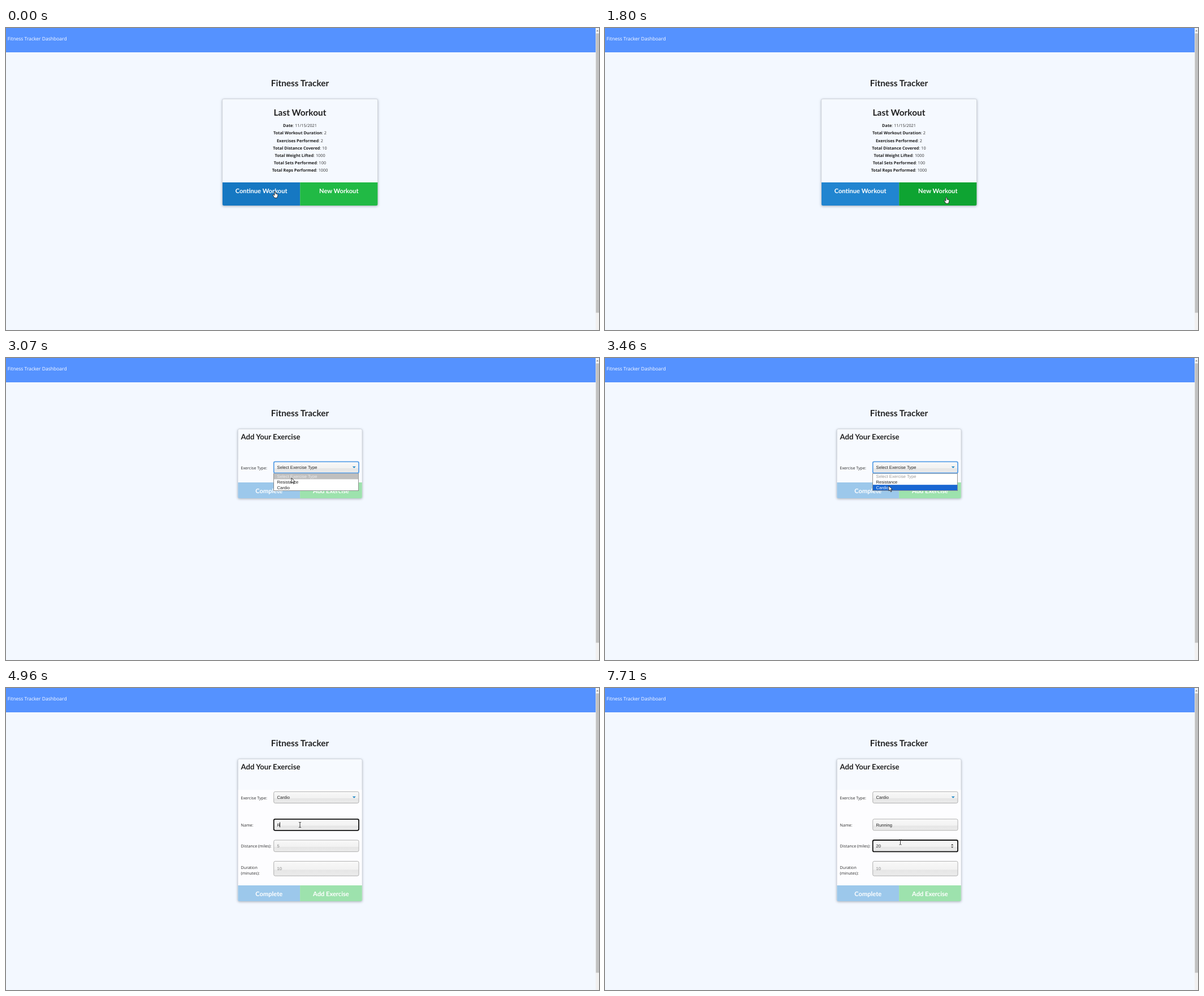
These frames come from a looping animation (1049x534 px, 8 s). An HTML page with a canvas:

```html
<!DOCTYPE html>
<html lang="en">
<head>
<meta charset="utf-8">
<title>Fitness Tracker</title>
<style>
html, body { margin: 0; width: 100%; height: 100%; overflow: hidden; background: #f3f8ff; }
canvas { display: block; }
</style>
</head>
<body>
<canvas id="stage" width="1049" height="534"></canvas>
<script>
const ctx = document.getElementById('stage').getContext('2d');
ctx.textRendering = 'geometricPrecision';

const LOOP = 8000;
const LATO = 'Lato, sans-serif';
const BODY = '"Open Sans", sans-serif';
const ARIAL = '"Liberation Sans", Arial, sans-serif';

// Moments when the page changes
const CLICK_NEW = 1800, FORM = 1950, OPEN = 2610, CHOSEN = 3710;
const FOCUS_NAME = 4250, LEAVE_NAME = 6050, FOCUS_DISTANCE = 6470;
const NAME_KEYS = [4960, 5110, 5230, 5350, 5470, 5620, 5620];
const DISTANCE_KEYS = [7030, 7180];

// time, pointer shape, hot spot
const POINTER = [
  [0, 'hand', 476, 289], [560, 'hand', 482, 291], [710, 'hand', 492, 292],
  [860, 'hand', 496, 293], [1140, 'hand', 536, 295], [1290, 'hand', 588, 299],
  [1410, 'hand', 610, 300], [1800, 'hand', 604, 299], [1950, 'arrow', 604, 298],
  [2100, 'arrow', 588, 268], [2250, 'arrow', 549, 226], [2370, 'arrow', 516, 203],
  [2490, 'arrow', 505, 195], [2920, 'arrow', 505, 201], [3070, 'arrow', 505, 212],
  [3190, 'arrow', 504, 218], [3340, 'arrow', 502, 226], [3560, 'arrow', 501, 228],
  [3710, 'arrow', 501, 229], [3830, 'beam', 504, 238], [3980, 'beam', 514, 241],
  [4130, 'beam', 520, 242], [6050, 'beam', 521, 247], [6200, 'arrow', 522, 257],
  [6320, 'beam', 522.5, 272.5]
];

const SHAPES = {
  hand: new Path2D('M-1 1Q0-.8 1 1V4L4 4.7Q5 5 5 6.2L4.4 9 3.4 11.3H-1L-3.8 7Q-4.2 5 -2.5 5.8L-1 7.2Z'),
  arrow: new Path2D('M0 0V9L2.1 7.2 3.6 10.6 5 10 3.5 6.7H6.3Z'),
  beam: new Path2D('M-2-4.5H-.7L0-4 .7-4.5H2M0-4V4M-2 4.5H-.7L0 4 .7 4.5H2')
};

const keysPressed = (keys, t) => keys.filter(k => t >= k).length;
const within = (t, from, to) => t >= from && t < to;

function rect(x, y, w, h, color) {
  ctx.fillStyle = color;
  ctx.fillRect(x, y, w, h);
}

function box(x, y, w, h, radius, fill, stroke, line = 1) {
  ctx.beginPath();
  ctx.roundRect(x, y, w, h, radius);
  if (fill) { ctx.fillStyle = fill; ctx.fill(); }
  if (stroke) { ctx.strokeStyle = stroke; ctx.lineWidth = line; ctx.stroke(); }
}

function text(str, x, y, font, color = '#212121', align = 'left') {
  ctx.font = font;
  ctx.fillStyle = color;
  ctx.textAlign = align;
  ctx.fillText(str, x, y);
}

function triangle(x, y, half, height, color) {
  ctx.fillStyle = color;
  ctx.beginPath();
  ctx.moveTo(x - half, y);
  ctx.lineTo(x + half, y);
  ctx.lineTo(x, y + height);
  ctx.fill();
}

function drawPage() {
  rect(0, 0, 1049, 534, '#f3f8ff');
  rect(0, 0, 1043, 43, '#5592ff');
  text('Fitness Tracker Dashboard', 2.7, 22.4, `8.53px ${BODY}`, '#fff');
  rect(1043, 0, 6, 534, '#f1f1f1');
  rect(1043.5, 9.5, 5.5, 494, '#c1c1c1');
  triangle(1046.2, 6, 2, -2.5, '#888');
  text('Fitness Tracker', 520, 103, `bold 15.4px ${LATO}`, '#212121', 'center');
}

function drawCard(x, y, w, h, fill) {
  ctx.save();
  ctx.shadowColor = 'rgba(90,100,115,.55)';
  ctx.shadowBlur = 4;
  ctx.shadowOffsetY = 1;
  box(x, y, w, h, 2.5, fill);
  ctx.restore();
  box(x, y, w, h, 2.5, null, '#cdd1d7', .8);
}

function drawButtons(x, y, w, h, labels, colors, baseline) {
  const half = w / 2;
  labels.forEach((label, i) => {
    box(x + i * half, y, half, h, i ? [0, 0, 2.5, 0] : [0, 0, 0, 2.5], colors[i]);
    text(label, x + (i + .5) * half, baseline, `bold 11.1px ${LATO}`, '#fff', 'center');
  });
}

function drawStat(label, value, y) {
  const bold = `bold 7.3px ${BODY}`, plain = `7.3px ${BODY}`;
  const rest = ': ' + value;
  ctx.font = bold;
  const labelWidth = ctx.measureText(label).width;
  ctx.font = plain;
  const x = 520 - (labelWidth + ctx.measureText(rest).width) / 2;
  text(label, x, y, bold);
  text(rest, x + labelWidth, y, plain, '#333');
}

function drawSummary(t) {
  drawCard(382.7, 125.5, 274.8, 188.5, '#f5f9ff');
  text('Last Workout', 520, 155, `bold 15.4px ${LATO}`, '#212121', 'center');
  Object.entries({
    'Date': '11/15/2021',
    'Total Workout Duration': 2,
    'Exercises Performed': 2,
    'Total Distance Covered': 10,
    'Total Weight Lifted': 1000,
    'Total Sets Performed': 100,
    'Total Reps Performed': 1000
  }).forEach(([label, value], i) => drawStat(label, value, 175.3 + i * 13.17));

  const blue = t < 1140 ? '#1678c2' : '#2185d0';
  const green = t < 1140 ? '#21ba45' : t < CLICK_NEW ? '#16ab39' : '#0ea432';
  drawButtons(383, 273, 274.4, 41, ['Continue Workout', 'New Workout'], [blue, green], 291.5);
}

function drawField(y, h, str, { color = '#222', focus, ring = '#111', caret } = {}) {
  const shade = ctx.createLinearGradient(0, y, 0, y + h);
  [[0, '#fafafa'], [.25, '#f5f5f5'], [.56, '#f2f2f2'], [.6, '#e6e6e6'], [1, '#ebebeb']]
    .forEach(([at, tone]) => shade.addColorStop(at, tone));
  box(473.7, y, 150.4, h, 2.5, shade, focus ? ring : '#a9a9a9', focus ? 1.8 : .9);
  const mid = y + h / 2;
  const font = `7.6px ${ARIAL}`;
  text(str, 479.6, mid + 2.8, font, color);
  if (caret) rect(479 + Math.round(ctx.measureText(str).width), mid - 4.5, 1, 9, '#222');
}

function drawTyped(y, h, typed, hint, focus, caret) {
  drawField(y, h, typed || hint, { color: typed ? '#222' : '#858585', focus, caret: caret && typed });
  if (caret && !typed) rect(479, y + h / 2 - 4.5, 1, 9, '#222');
}

function drawLabel(str, y) {
  text(str, 415.6, y, `7.1px ${BODY}`, '#2b2b2b');
}

function drawOptions(t) {
  const hovered = t < 3190 ? 0 : t < 3340 ? 1 : 2;
  rect(473.2, 204, 150.8, 31, '#777');
  rect(474, 204.6, 149.2, 29.6, '#fff');
  rect(474, 204.6 + hovered * 9.8, 149.2, 9.8, hovered ? '#1967d2' : '#bfbfbf');
  ['Select Exercise Type', 'Resistance', 'Cardio'].forEach((option, i) => {
    const color = i === hovered ? (i ? '#fff' : '#ececec') : i ? '#222' : '#999';
    text(option, 479.6, 211.8 + i * 9.85, `7.6px ${ARIAL}`, color);
  });
}

function drawCardioFields(t) {
  const name = 'Running'.slice(0, keysPressed(NAME_KEYS, t));
  const distance = '20'.slice(0, keysPressed(DISTANCE_KEYS, t));
  const nameCaret = within(t, FOCUS_NAME, 4680) || within(t, NAME_KEYS[0], LEAVE_NAME);

  drawLabel('Name:', 244.8);
  drawTyped(231.8, 20, name, 'Running', within(t, FOCUS_NAME, FOCUS_DISTANCE), nameCaret);
  drawLabel('Distance (miles):', 282.3);
  drawTyped(269, 20.4, distance, '5', t >= FOCUS_DISTANCE, within(t, FOCUS_DISTANCE, 7710));
  if (t >= 6320) {
    triangle(614.2, 278.2, 2.2, -2.4, '#444');
    triangle(614.2, 280.4, 2.2, 2.4, '#444');
  }
  drawLabel('Duration', 319.7);
  drawLabel('(minutes):', 330.2);
  drawTyped(306.4, 25.8, '', '10');
}

function drawForm(t) {
  const chosen = t >= CHOSEN;
  const bottom = chosen ? 377 : 248;
  drawCard(410.2, 125.5, 219.8, bottom - 125.5, '#f7faff');
  rect(410.7, 180, 218.8, bottom - 182, chosen ? '#fdfdff' : '#f9fbff');
  text('Add Your Exercise', 415.5, 144, `bold 13.2px ${LATO}`);
  drawButtons(410.4, bottom - 28, 219.4, 28, ['Complete', 'Add Exercise'],
    ['#9cc8eb', '#9de2ad'], bottom - 9.3);

  drawLabel('Exercise Type:', 196.7);
  drawField(183.3, 20.2, chosen ? 'Cardio' : 'Select Exercise Type',
    { focus: within(t, OPEN, FOCUS_NAME), ring: '#5a9fe6' });
  triangle(615.8, 191.8, 3, 3, '#1683c4');
  if (chosen) drawCardioFields(t);
  else if (t >= OPEN) drawOptions(t);
}

function drawPointer(t) {
  const [, shape, x, y] = POINTER.findLast(p => t >= p[0]);
  ctx.save();
  ctx.translate(x, y);
  ctx.strokeStyle = '#222';
  ctx.lineWidth = .9;
  if (shape !== 'beam') {
    ctx.fillStyle = '#fff';
    ctx.fill(SHAPES[shape]);
  }
  ctx.stroke(SHAPES[shape]);
  ctx.restore();
}

function frame(now) {
  const t = now % LOOP;
  drawPage();
  if (t < FORM) drawSummary(t);
  else drawForm(t);
  drawPointer(t);
  requestAnimationFrame(frame);
}
requestAnimationFrame(frame);
</script>
</body>
</html>
```
